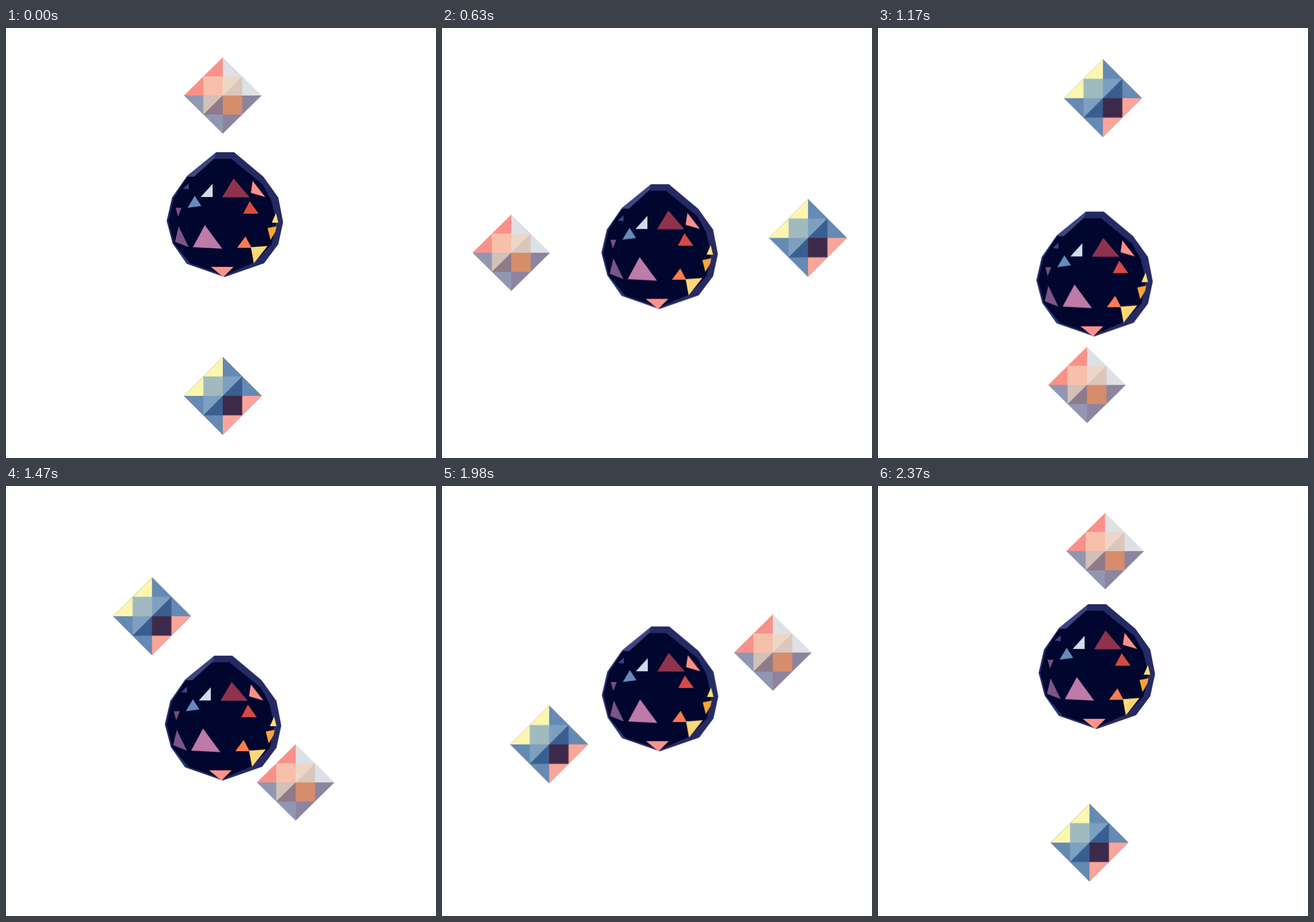
An HTML page without scripts that plays this animation: 720 by 720 pixels, repeating every 2.4 s.

```html
<!DOCTYPE html>
<html lang="en">
<head>
<meta charset="utf-8">
<title>Orbiting gems</title>
<style>
  html, body { margin: 0; width: 100%; height: 100%; overflow: hidden; background: #fff; }
  svg { display: block; width: 100vw; height: 100vh; }

  /* Everything moves in a straight line between stops, one step per 30 ms. */
  .egg, .gem { animation: 2400ms -4ms infinite; }
  .egg { animation-name: bob; animation-timing-function: steps(40); }
  .gem { animation-timing-function: steps(20); }

  .warm {
    animation-name: orbit-warm;
    --base: none;
    --nw: #fa9189; --ne: #dde0e5; --sw: #9196b3; --se: #8d849f;
    --tile-nw: #f7c0ab; --tile-se: #d58d6c;
    --ne-light: #ecd7c7; --ne-dark: #dbc6bc;
    --sw-light: #d3c0b8; --sw-dark: #8f7b88;
  }
  .cool {
    animation-name: orbit-cool;
    --base: #3d2a4a;
    --nw: #fcf7ae; --ne: #658ab3; --sw: #658ab3; --se: #fca49a;
    --tile-nw: #a0babf; --tile-se: #3d2a4a;
    --ne-light: #7ea0c0; --ne-dark: #395e90;
    --sw-light: #7ea0c0; --sw-dark: #395e90;
  }

  @keyframes bob {
    50% { transform: translate(-4px, 102px); }
    100% { transform: translate(0, -13px); }
  }
  @keyframes orbit-warm {
    0% { transform: translate(363px, 113px); }
    25% { transform: translate(103px, 364px); }
    50% { transform: translate(363px, 610px); }
    75% { transform: translate(634px, 357.3px); }
    100% { transform: translate(367px, 96px); }
  }
  @keyframes orbit-cool {
    0% { transform: translate(363px, 616px); }
    25% { transform: translate(626px, 364.5px); }
    50% { transform: translate(363.5px, 104.5px); }
    75% { transform: translate(98.8px, 356.8px); }
    100% { transform: translate(367.5px, 609.7px); }
  }
</style>
</head>
<body>
<svg viewBox="0 0 720 720">
  <defs>
    <g id="diamond">
      <path fill="var(--base)" d="M0-65L65 0L0 65L-65 0Z"/>
      <path fill="var(--nw)" d="M0 0V-65L-65 0Z"/>
      <path fill="var(--ne)" d="M0 0V-65L65 0Z"/>
      <path fill="var(--sw)" d="M0 0V65L-65 0Z"/>
      <path fill="var(--se)" d="M0 0V65L65 0Z"/>
      <path fill="var(--tile-nw)" d="M0 0H-32.5V-32.5H0Z"/>
      <path fill="var(--tile-se)" d="M0 0H32.5V32.5H0Z"/>
      <path fill="var(--ne-light)" d="M0 0V-32.5H32.5Z"/>
      <path fill="var(--ne-dark)" d="M0 0H32.5V-32.5Z"/>
      <path fill="var(--sw-light)" d="M0 0H-32.5V32.5Z"/>
      <path fill="var(--sw-dark)" d="M0 0V32.5H-32.5Z"/>
    </g>
  </defs>

  <g class="egg">
    <!-- rim and its lighter facets -->
    <path fill="#252a64" d="M352 208H382L431 249L456 284L464 325L456 362L432 394L366 417L303 395L279 361L269 323L278 284L303 248Z"/>
    <path fill="#3d4681" d="M351 209L303 248L302 252L316 249L349 219Z"/>
    <path fill="#213a7a" d="M280 361L303 395H309L288 365Z"/>
    <path fill="#01062f" d="M348 219H377L429 261L444 288L452.500 324L445 362L415 393L366 414L308 394L282 362L272 323L281 285L304 249H315Z"/>
    <!-- shards -->
    <path fill="#3b4584" d="M306 260V270L296 269Z"/>
    <path fill="#d0dde9" d="M346 261V283H326Z"/>
    <path fill="#8f334d" d="M381 252L408 283.500H362Z"/>
    <path fill="#fb9187" d="M413 256L434 283L410 276Z"/>
    <path fill="#658cb9" d="M316 281L327 298L304 301Z"/>
    <path fill="#d64a44" d="M408 290L423 311H397Z"/>
    <path fill="#75507f" d="M284 301H294L288 316Z"/>
    <path fill="#fde07c" d="M452 310L456 326H445Z"/>
    <path fill="#fda638" d="M438 335L453 332L451 341L443 355Z"/>
    <path fill="#7d5488" d="M289 332L306 367L283 358Z"/>
    <path fill="#be7aa9" d="M333 330L362 369.500L313 367Z"/>
    <path fill="#fb7c50" d="M401 349L411 368H387Z"/>
    <path fill="#fed776" d="M410 367L438 365L415 394Z"/>
    <path fill="#fb9389" d="M343 400H381L364 417Z"/>
  </g>

  <g class="gem warm"><use href="#diamond" transform="scale(1 .985)"/></g>
  <g class="gem cool"><use href="#diamond"/></g>
</svg>
</body>
</html>
```
